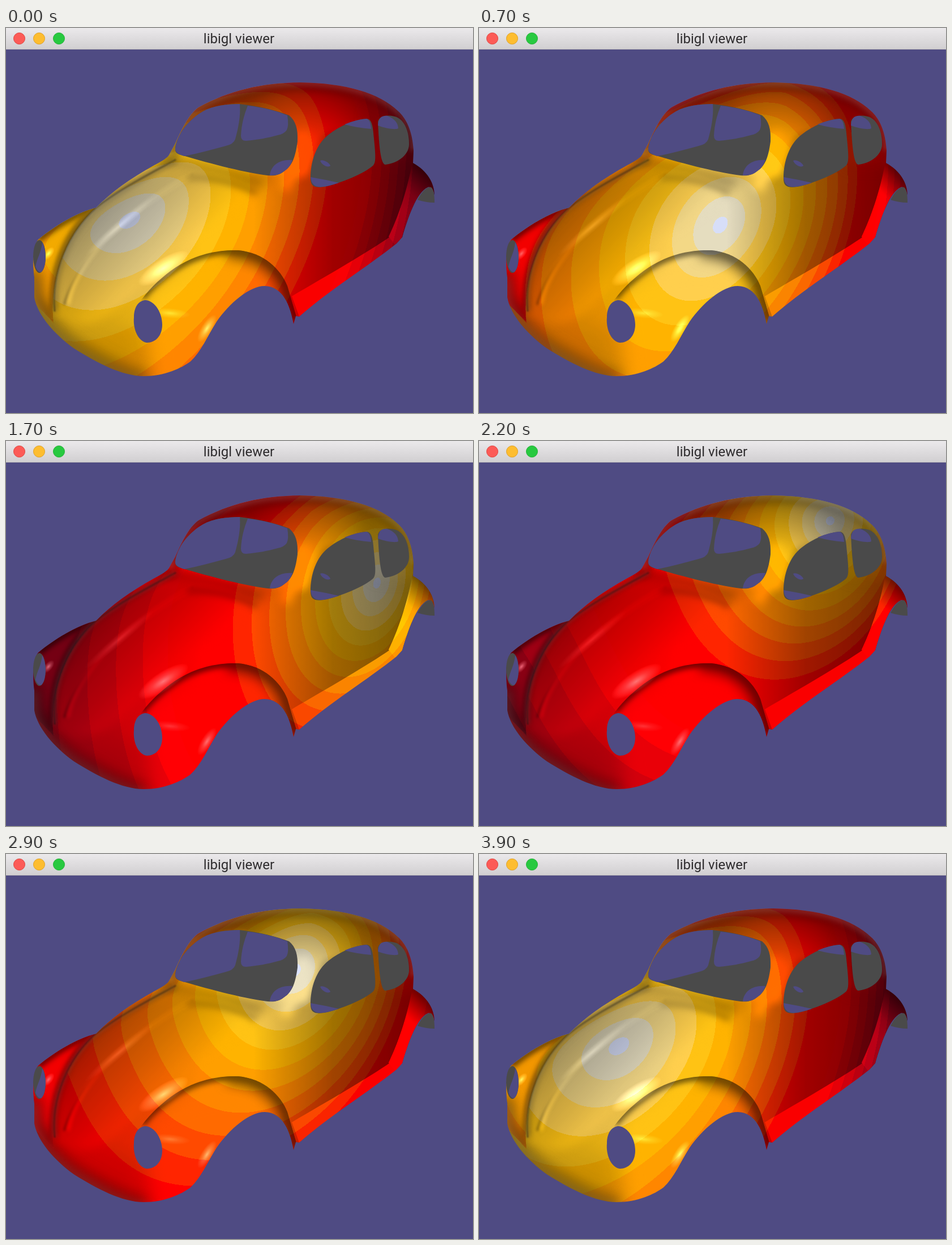
Recreate the animation shown at these times as an HTML page with a canvas. Size 825x679 px, loop 4000 ms.

```html
<!DOCTYPE html>
<html lang="en">
<head>
<meta charset="utf-8">
<title>libigl viewer</title>
<style>
html, body { margin: 0; width: 825px; height: 679px; overflow: hidden; background: #4f4b83; }
canvas { position: absolute; left: 0; top: 0; }
.bar {
  position: absolute; left: 0; top: 0; width: 825px; height: 38px; box-sizing: border-box;
  background: linear-gradient(#ebe9eb, #d1cfd1); border-bottom: 1px solid #b3b0b6;
  font: 24px/38px Roboto, "Liberation Sans", sans-serif; color: #2e2c2e; text-align: center;
  text-indent: -2px;
}
.bar i { position: absolute; top: 8px; width: 21px; height: 21px; border-radius: 50%; box-sizing: border-box; }
.bar i:nth-child(1) { left: 13px; background: #fc5b57; border: 1px solid #e0443f; }
.bar i:nth-child(2) { left: 48px; background: #fdbd30; border: 1px solid #dfa023; }
.bar i:nth-child(3) { left: 83px; background: #28c940; border: 1px solid #1fb032; }
</style>
</head>
<body>
<canvas id="view" width="825" height="679"></canvas>
<div class="bar"><i></i><i></i><i></i>libigl viewer</div>
<script>
const W = 825, H = 679, BG = '#4f4b83', INNER = '#4a4a4a';
const X0 = 44, Y0 = 92, CW = 718, CH = 526; // box around the car
const path = d => new Path2D(d);

// ---- outlines ----
const body = path(`M159 317C125 325 85 350 57 373C47 385 47 415 50 440L50 475C55 505 85 540 120 565
  C160 590 205 614 243 614C280 614 310 600 326 588C345 570 355 545 372 518C395 485 430 455 457 455
  C490 456 502 490 508 522L512 508L518 509C570 463 640 420 690 380L700 369C710 335 725 290 745 281
  C751 279 755 285 757 295C757 275 745 252 719 238L720 216C718 180 706 158 692 146
  C660 115 600 97 520 96C450 97 395 110 340 140C322 153 310 180 299 204L288 224
  Q285 230 262 242C220 265 185 290 159 317Z`);
const farFender = path('M159 317C125 325 85 350 57 373L40 400L46 480L84 520C76 440 108 362 159 317Z');
const hood = path(`M88 500C76 430 110 360 159 317C200 285 245 262 300 243C350 246 405 266 445 292
  C400 325 330 360 270 420C230 455 170 540 118 515Z`);
const roof = path('M270 235L300 60L760 60L725 215L655 240L640 170L560 190L532 262L480 262L420 140L330 150Z');
const fender = path(`M208 545C216 500 255 452 300 422C340 396 380 391 410 392C455 396 485 425 497 455
  L519 530L400 640L200 640Z`);
const crease = path('M240 475C255 455 275 439 300 422C340 396 380 391 410 392C455 396 485 425 497 455L513 515');
const board = path('M505 473C570 435 640 395 680 367L688 372L700 369L690 381C640 420 570 465 518 509Z');
const rearFender = path(`M718 236C708 290 692 335 676 368L687 382L700 369C710 335 725 290 745 281
  L760 295C758 270 745 250 719 238Z`);
const hoodEdge = path('M86 500C79 430 110 360 159 317C200 285 245 262 300 232');
const rib = 'C118 435 165 375 215 335C255 303 290 280 330 258';
const noseEdge = path('M44 440L46 475C50 510 85 546 120 570C160 594 205 622 250 628');
const roofEdge = path('M288 224L299 204C310 180 322 153 340 140C395 110 450 97 520 96C600 97 660 115 692 146C706 158 718 180 720 216');

const gray = [
  'M299 213C302 188 322 162 348 147C366 137 390 134 413 134C450 138 478 146 500 154C512 164 516 178 515 200C511 230 505 243 492 252C482 260 474 261 462 260C415 254 350 236 306 223Q298 220 299 213Z',
  'M538 265C538 235 548 205 570 188C590 172 615 162 636 160C646 160 648 170 650 195C653 225 654 238 648 243C635 255 590 275 562 280C545 282 538 280 538 265Z',
  'M657 165C660 153 680 152 692 158C706 166 712 185 712 205C712 222 695 238 670 241C662 240 659 210 657 165Z',
  'M727 303C735 288 744 279 751 281Q757 285 757 308Q742 308 727 303Z',
  'M48 403A11 29 0 1 1 70 403A11 29 0 1 1 48 403Z'
].map(path);
const gaps = [
  'M299 213C302 188 322 162 348 147C366 137 390 134 413 134C415 155 410 178 405 196Q402 205 388 208C365 214 340 221 315 226Q298 221 299 213Z',
  'M427 137C455 140 480 147 497 154Q500 172 496 180Q491 187 480 189C462 194 445 197 424 199Q415 199 415 190C416 170 420 155 427 137Z',
  'M466 260C468 243 482 231 506 233Q502 246 492 252Q482 261 466 260Z',
  'M598 170Q620 161 637 160Q644 162 645 178Q620 176 598 170Z',
  'M555 234C560 231 572 238 573 243C569 247 558 242 555 234Z',
  'M538 263Q562 267 588 273Q570 279 560 280Q540 283 538 263Z',
  'M657 172C658 158 664 154 674 155Q692 162 693 177C688 180 670 177 657 172Z',
  'M64 378C71 387 73 420 63 430Q57 433 52 421C55 405 62 397 64 378Z',
  'M226 510C226 490 236 480 247 480C264 482 276 503 276 523C276 543 264 555 249 555C234 553 224 532 226 510Z'
].map(path);

// ---- static light maps ----
const layer = () => {
  const c = document.createElement('canvas');
  c.width = W; c.height = H;
  return c.getContext('2d', { willReadFrequently: true });
};
const tone = (v, a = 1) => `rgba(${v * 170},${v * 170},${v * 170},${a})`;
const ramp = (grad, ...stops) => {
  stops.forEach(([p, v]) => grad.addColorStop(p, tone(v)));
  return grad;
};
const soft = (g, p, style, blur, width) => {
  g.filter = blur ? `blur(${blur}px)` : 'none';
  g.fillStyle = g.strokeStyle = style;
  if (width) { g.lineWidth = width; g.stroke(p); } else g.fill(p);
  g.filter = 'none';
};
const within = (g, p, draw) => { g.save(); g.clip(p); draw(); g.restore(); };

function paintShade() {
  const g = layer();
  soft(g, path('M0 0H825V679H0Z'), ramp(g.createLinearGradient(0, 0, W, 0),
    [0, .8], [.3, .92], [.42, 1], [.53, 1], [.6, .84], [.7, .63], [.86, .48]));
  soft(g, path('M250 215L470 262L440 290L300 262Z'), tone(.7), 10);
  soft(g, path('M80 500L230 530L250 620L150 620Z'), tone(.8), 20);
  soft(g, noseEdge, tone(.3), 14, 30);

  within(g, farFender, () => {
    soft(g, farFender, tone(.95));
    soft(g, path('M159 317C125 325 85 350 57 373'), tone(.4), 5, 12);
    soft(g, hoodEdge, tone(.5), 5, 10);
    soft(g, path('M46 430L50 480L90 530'), tone(.35), 12, 26);
  });

  soft(g, hood, ramp(g.createLinearGradient(160, 290, 300, 420),
    [0, .6], [.3, .74], [.6, .84], [1, 1]), 8);
  within(g, body, () => {
    soft(g, hoodEdge, tone(.45), 5, 10);
    soft(g, hoodEdge, tone(.34), 1, 3);
  });
  soft(g, path('M103 488' + rib), tone(.5), 2, 4);
  soft(g, path('M110 488' + rib), tone(1), 3, 5);
  soft(g, path('M320 264C360 262 405 272 442 291'), tone(.62, .8), 6, 10);

  within(g, body, () => {
    soft(g, roof, ramp(g.createRadialGradient(525, 245, 0, 525, 245, 152),
      [0, 1.05], [.3, 1], [.55, .82], [.75, .68], [1, .52]), 7);
    soft(g, path('M640 150L725 160L725 240L655 240Z'), tone(.56, .8), 12);
    soft(g, roofEdge, tone(.38), 8, 20);
  });
  soft(g, path('M522 185C530 210 512 245 490 285'), tone(1.03), 8, 22);

  within(g, fender, () => {
    soft(g, path('M250 480C300 430 400 400 470 450L400 640L270 640Z'), tone(1), 14);
    soft(g, path('M390 390C455 396 485 425 497 455L513 520'), tone(.5), 10, 30);
    soft(g, crease, tone(.45), 5, 14);
  });
  soft(g, board, tone(.98), .6);
  soft(g, rearFender, ramp(g.createLinearGradient(700, 320, 752, 262),
    [0, 1.12], [.4, .98], [1, .4]), .6);
  return g;
}

// red: highlight, blue: extra distance of the far fender
function paintGlow() {
  const g = layer();
  g.fillStyle = '#000';
  g.fillRect(0, 0, W, H);
  soft(g, farFender, 'rgb(0,0,25)');
  g.globalCompositeOperation = 'lighter';
  const spot = (x, y, rx, ry, deg, v) => {
    g.save();
    g.translate(x, y);
    g.rotate(deg * Math.PI / 180);
    g.scale(rx, ry);
    const r = g.createRadialGradient(0, 0, 0, 0, 0, 1);
    r.addColorStop(0, `rgb(${v},0,0)`);
    r.addColorStop(.45, `rgb(${v * .45 | 0},0,0)`);
    r.addColorStop(1, 'rgb(0,0,0)');
    g.fillStyle = r;
    g.fillRect(-1, -1, 2, 2);
    g.restore();
  };
  spot(278, 424, 52, 17, -33, 115);
  spot(290, 503, 36, 9, 5, 50);
  spot(355, 530, 28, 10, -58, 110);
  spot(75, 398, 14, 7, -50, 100);
  spot(200, 350, 80, 9, -40, 30);
  soft(g, roofEdge, 'rgb(34,0,0)', 5, 12);
  soft(g, noseEdge, 'rgb(28,0,0)', 8, 24);
  soft(g, hoodEdge, 'rgb(26,0,0)', 3, 6);
  return g;
}

// ---- surface unrolled to a plane, measured in band widths ----
// Bands narrow linearly towards the rear; the surface curls away near the upper outline.
function unroll(x, y) {
  const stepX = 62.5 - .07 * x, stepY = 57.3 - .052 * x;
  const waist = 513 - .37 * x, top = 96 + .58 * Math.max(0, 540 - x);
  const curl = 1.8 * Math.log(1 + Math.exp((top - y) / 30));
  return [-Math.log(stepX / 24) / .07, (y - waist) / stepY - curl];
}

// white, amber, orange, red, dark red
const clamp = v => Math.max(0, Math.min(255, v));
const colours = Array.from({ length: 21 }, (_, d) => [
  clamp(Math.min(215 + 14 * d, 255, 255 - 22 * (d - 14))),
  clamp(222 - 1.47 * d ** 2.1),
  clamp(Math.max(248 - 57 * d, Math.min(20, 4 * (d - 13))))
]);

// ---- per-pixel data, only inside the car ----
const pixels = g => g.getImageData(X0, Y0, CW, CH).data;
const shade = pixels(paintShade()), glow = pixels(paintGlow());
const maskLayer = layer();
soft(maskLayer, body, '#fff', 0, 4);
soft(maskLayer, body, '#fff');
const mask = pixels(maskLayer);
const U = new Float32Array(CW * CH), V = new Float32Array(CW * CH);
for (let i = 0; i < CW * CH; i++) {
  if (mask[i * 4 + 3]) [U[i], V[i]] = unroll(X0 + i % CW, Y0 + Math.floor(i / CW));
}

// ---- moving point: step, x, y ----
const route = [
  [0, 218, 338], [7, 426, 347], [11, 554, 351], [17, 655, 250],
  [22, 620, 140], [26, 536, 139], [33, 463, 297], [39, 247, 338]
];
function pointAt(step) {
  let i = 0;
  while (i < route.length - 2 && route[i + 1][0] <= step) i++;
  const p = route[i], q = route[i + 1], span = q[0] - p[0], s = (step - p[0]) / span;
  const slope = (j, k) => {
    const a = route[Math.max(j - 1, 0)], b = route[Math.min(j + 1, route.length - 1)];
    return (b[k] - a[k]) / (b[0] - a[0]);
  };
  return [1, 2].map(k => {
    const h = s * s * (3 - 2 * s);
    return p[k] * (1 - h) + q[k] * h +
      span * (s * (1 - s) * (1 - s) * slope(i, k) - s * s * (1 - s) * slope(i + 1, k));
  });
}

const ctx = document.getElementById('view').getContext('2d');
const skin = layer();
const image = skin.createImageData(CW, CH);
function draw(step) {
  const [u, v] = unroll(...pointAt(step)), out = image.data;
  for (let i = 0, j = 0; i < CW * CH; i++, j += 4) {
    if (!mask[j + 3]) continue;
    const d = Math.hypot(U[i] - u, V[i] - v) + glow[j + 2] / 10;
    const c = colours[Math.min(colours.length - 1, Math.floor(d + .6))];
    const k = shade[j] / 170, add = glow[j];
    out[j] = c[0] * k + add;
    out[j + 1] = c[1] * k + add;
    out[j + 2] = c[2] * k + add;
    out[j + 3] = 255;
  }
  skin.putImageData(image, X0, Y0);
  ctx.fillStyle = BG;
  ctx.fillRect(0, 0, W, H);
  within(ctx, body, () => ctx.drawImage(skin.canvas, 0, 0));
  gray.forEach(p => soft(ctx, p, INNER));
  gaps.forEach(p => soft(ctx, p, BG));
}

let shown = -1;
function tick() {
  const step = Math.floor(performance.now() % 4000 / 100);
  if (step !== shown) draw(shown = step);
  requestAnimationFrame(tick);
}
tick();
</script>
</body>
</html>
```
